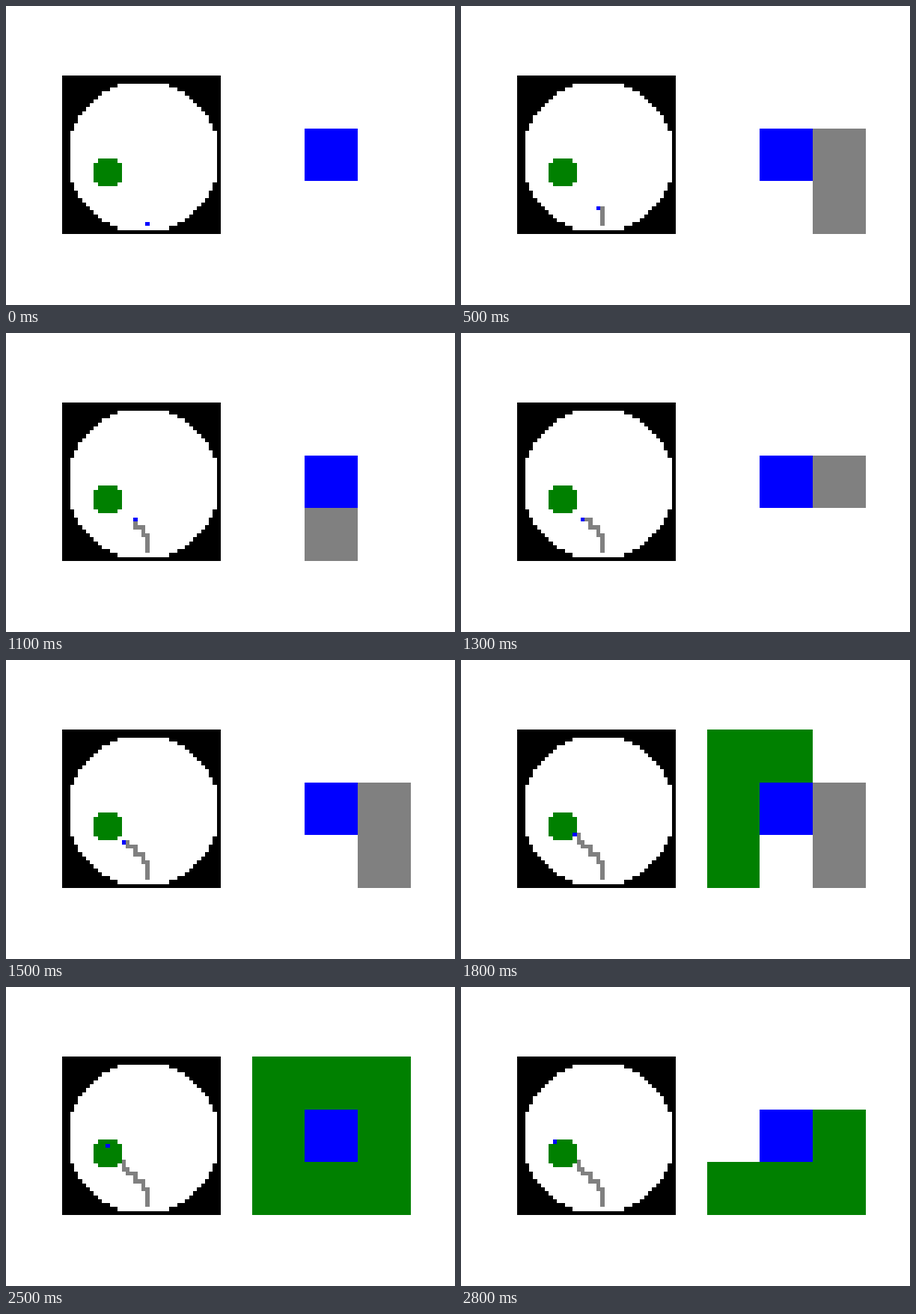
Recreate the animation shown at these times as an HTML page with a canvas. Size 600 px wide and 400 px high, loop 2900 ms.

```html
<!DOCTYPE html>
<html lang="en">
<head>
<meta charset="utf-8">
<title>Grid walk</title>
<style>
html, body { margin: 0; width: 100%; height: 100%; overflow: hidden; background: #fff; }
canvas { display: block; }
</style>
</head>
<body>
<canvas id="stage" width="600" height="400"></canvas>
<script>
const ctx = document.getElementById('stage').getContext('2d');
const SIZE = 40, PANEL = 212, TOP = 93, STEP_MS = 100;
const MOVES = 'UUUULUULLUULLULUULULULULULUL';

const path = [[21, 37]];
for (const move of MOVES) {
  const [x, y] = path[path.length - 1];
  path.push(move === 'U' ? [x, y - 1] : [x - 1, y]);
}

const inDisc = (x, y, cx, cy, r) => (x - cx) ** 2 + (y - cy) ** 2 < r * r;

function cellColor(x, y, step) {
  const visit = path.findIndex(([px, py]) => px === x && py === y);
  if (visit === step) return 'blue';
  if (inDisc(x, y, 11, 24, 4)) return 'green';
  if (visit >= 0 && visit < step) return 'gray';
  return inDisc(x, y, 20, 20, 19) ? 'white' : 'black';
}

// Draws a count × count window of the grid whose first cell is (col, row).
function drawPanel(left, count, col, row, step) {
  const edge = (start, i) => Math.round(start + i * PANEL / count);
  for (let j = 0; j < count; j++) {
    for (let i = 0; i < count; i++) {
      const x = edge(left, i), y = edge(TOP, j);
      ctx.fillStyle = cellColor(col + i, row + j, step);
      ctx.fillRect(x, y, edge(left, i + 1) - x, edge(TOP, j + 1) - y);
    }
  }
}

let shown = -1;
function render(now) {
  const step = Math.floor(now / STEP_MS) % path.length;
  if (step !== shown) {
    shown = step;
    const [x, y] = path[step];
    ctx.fillStyle = 'white';
    ctx.fillRect(0, 0, 600, 400);
    drawPanel(75, SIZE, 0, 0, step);
    drawPanel(328.6, 3, x - 1, y - 1, step);
  }
  requestAnimationFrame(render);
}
render(0);
</script>
</body>
</html>
```
